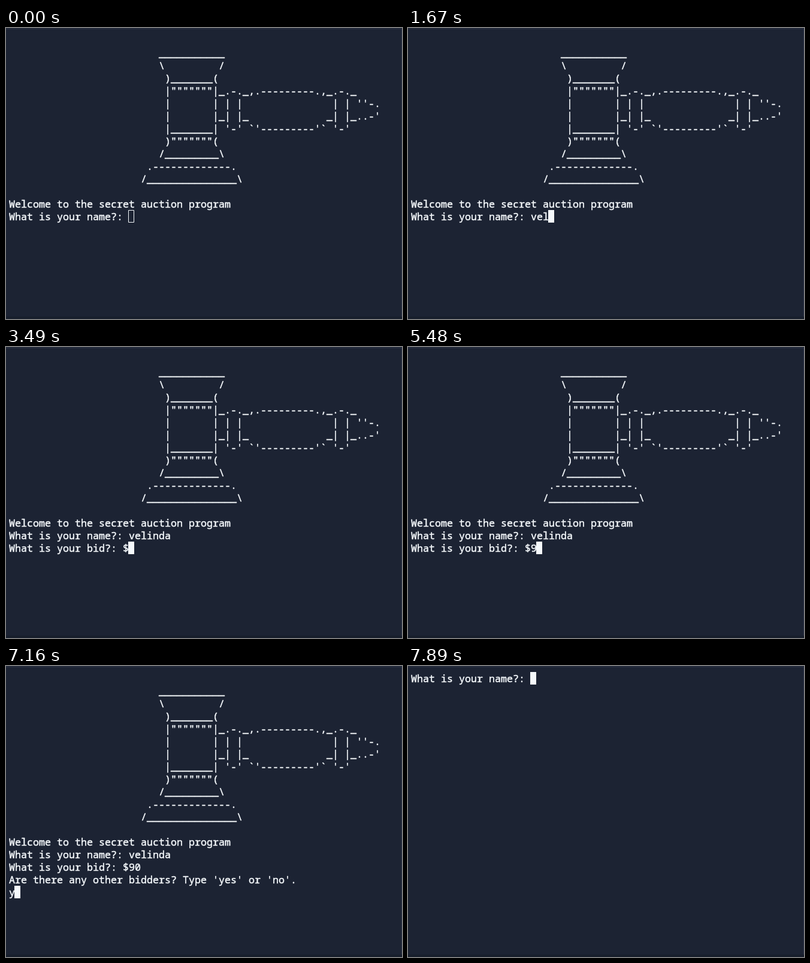
Animation, 661 px wide and 486 px high, one loop 8000 ms. Source, as an HTML page with a canvas:

```html
<!DOCTYPE html>
<html lang="en">
<head>
<meta charset="utf-8">
<title>Secret auction</title>
<style>
  html, body { margin: 0; width: 100%; height: 100%; overflow: hidden; background: #1c2333; }
  canvas { display: block; }
</style>
</head>
<body>
<canvas id="stage" width="661" height="486"></canvas>
<script>
const ctx = document.getElementById('stage').getContext('2d', { alpha: false });
const LOOP = 8000;
const CELL = { w: 10, h: 21, left: 4, top: 10, bearing: 1, baseline: 17 };
const COLOR = { back: '#1c2333', text: '#f5f9fc', line: '#2b3245', foot: '#171e2c', pointer: '#10151f' };

const pad = n => ' '.repeat(n);
const GAVEL = [
  '',
  pad(25) + '_'.repeat(11),
  pad(25) + '\\' + pad(9) + '/',
  pad(26) + ')_______(',
  pad(26) + '|"""""""|_.-._,.---------.,_.-._',
  pad(26) + '|       | | |' + pad(15) + "| | ''-.",
  pad(26) + '|       |_| |_' + pad(13) + "_| |_..-'",
  pad(26) + "|_______| '-' `'---------'` '-'",
  pad(26) + ')"""""""(',
  pad(25) + '/_________\\',
  pad(23) + '.-------------.',
  pad(22) + '/_______________\\',
  '',
  'Welcome to the secret auction program'
];
const ASK_NAME = 'What is your name?: ';
const ASK_BID = 'What is your bid?: $';
const ASK_MORE = "Are there any other bidders? Type 'yes' or 'no'.";

const FOCUS = 600, NAME_ENTER = 3430, BID_PROMPT = 3490, BID_ENTER = 6020, CLEAR = 7890;
const name = { text: 'velinda', keys: [1350, 1470, 1670, 2090, 2490, 3010, 3150] };
const bid = { text: '90', keys: [5480, 5700] };
const more = { text: 'yes', keys: [7160, 7350, 7750] };
const pointer = { from: [531, 430], to: [381, 329], start: 70, end: 670, steps: 8 };

const typed = (entry, t) => entry.text.slice(0, entry.keys.filter(k => k <= t).length);

// The cursor always follows the last character of the last line.
function screenAt(t) {
  if (t >= CLEAR) return [ASK_NAME];
  const lines = [...GAVEL, ASK_NAME + typed(name, t)];
  if (t >= NAME_ENTER) lines.push(t < BID_PROMPT ? '' : ASK_BID + typed(bid, t));
  if (t >= BID_ENTER) lines.push(ASK_MORE, typed(more, t));
  return lines;
}

function rect(color, x, y, w, h) {
  ctx.fillStyle = color;
  ctx.fillRect(x, y, w, h);
}

function drawLine(text, row) {
  const y = CELL.top + row * CELL.h + CELL.baseline;
  [...text].forEach((ch, col) => {
    if (ch === ' ') return;
    const x = CELL.left + CELL.bearing + col * CELL.w;
    ctx.fillText(ch, x, y);
    ctx.strokeText(ch, x, y);
  });
}

function drawCursor(col, row, focused) {
  const x = CELL.left + col * CELL.w, y = CELL.top + row * CELL.h;
  if (focused) {
    rect(COLOR.text, x, y, CELL.w, CELL.h);
  } else {
    ctx.lineWidth = 1;
    ctx.strokeRect(x + 0.5, y + 0.5, CELL.w - 1, CELL.h - 1);
  }
}

function drawPointer(t) {
  const { from, to, start, end, steps } = pointer;
  if (t < start || t >= end) return;
  const k = Math.floor((t - start) / (end - start) * steps) / (steps - 1);
  const [x, y] = from.map((v, i) => Math.round(v + (to[i] - v) * k));
  rect(COLOR.pointer, x, y - 8, 1, 17);
  rect(COLOR.pointer, x - 3, y - 8, 7, 1);
  rect(COLOR.pointer, x - 3, y + 8, 7, 1);
}

function draw(t) {
  rect(COLOR.back, 0, 0, 661, 486);
  rect(COLOR.line, 0, 1, 661, 1);
  rect(COLOR.line, 660, 1, 1, 481);
  rect(COLOR.foot, 0, 482, 661, 4);

  const lines = screenAt(t);
  ctx.font = '16.667px "Noto Sans Mono", monospace';
  ctx.textBaseline = 'alphabetic';
  ctx.lineJoin = 'round';
  ctx.lineWidth = 0.5;
  ctx.fillStyle = ctx.strokeStyle = COLOR.text;
  lines.forEach(drawLine);
  const last = lines.length - 1;
  drawCursor(lines[last].length, last, t >= FOCUS);
  drawPointer(t);
}

const start = performance.now();
function tick() {
  draw((performance.now() - start) % LOOP);
  requestAnimationFrame(tick);
}
tick();
</script>
</body>
</html>
```
